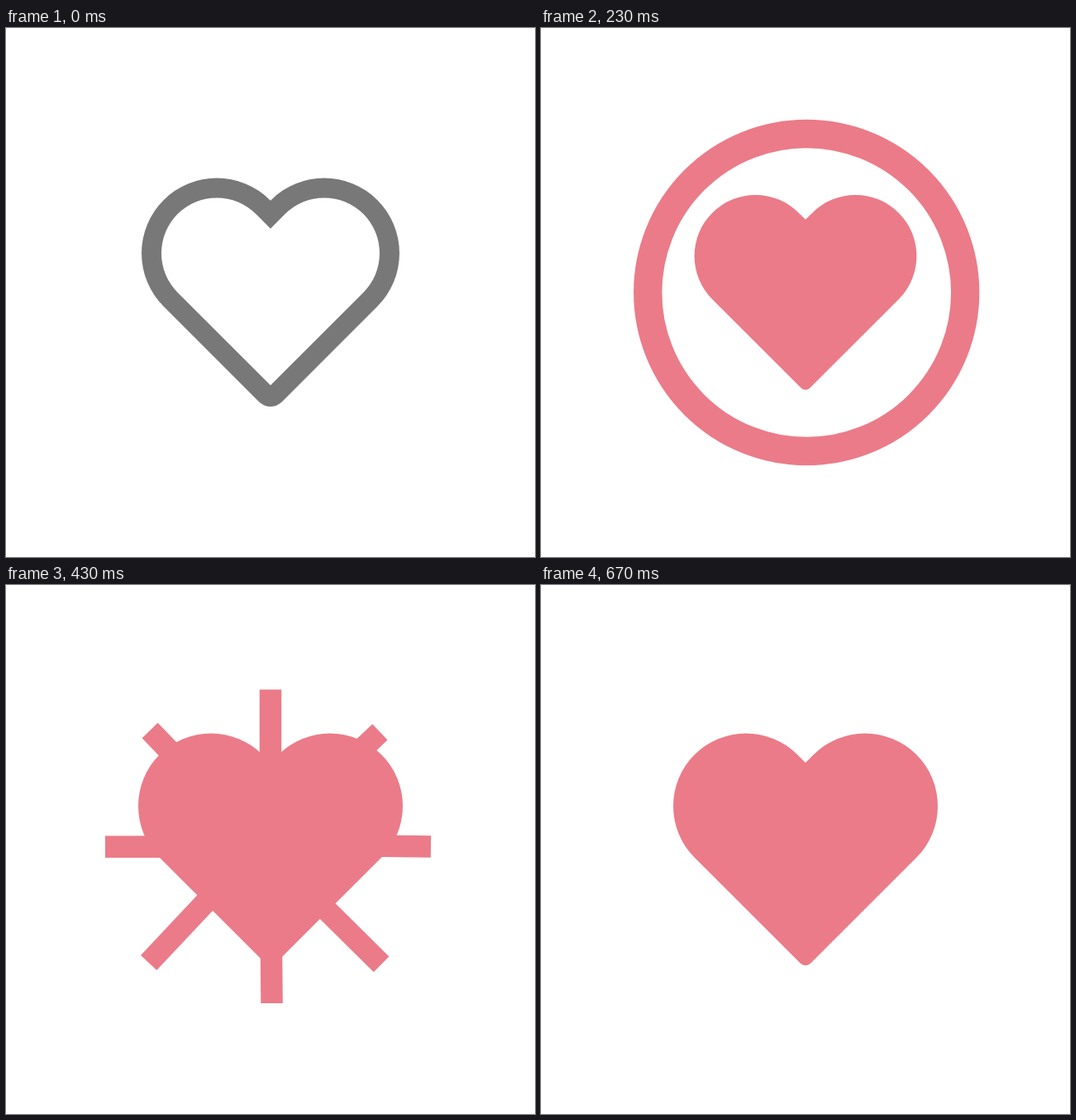
Animation, 640 px wide and 640 px high, one loop 810 ms. Source, as an HTML page with a canvas:

```html
<!DOCTYPE html>
<html lang="en">
<head>
<meta charset="utf-8">
<title>Like button</title>
<style>
html, body { margin: 0; width: 100%; height: 100%; overflow: hidden; background: #fff; }
canvas { display: block; width: 640px; height: 640px; }
</style>
</head>
<body>
<canvas id="stage" width="640" height="640"></canvas>
<script>
const ctx = document.getElementById('stage').getContext('2d');
const PINK = '#eb7b88', GREY = '#787878';
const LOOP = 810, FPS = 30, CENTER = 320;

// Each ray: outer end, inner end, and outward travel over three ticks.
const RAYS = [
  [320, 67.5, 320, 165.5, 59],
  [503.5, 129.5, 436, 193.5, 70.4],
  [579.5, 317.5, 470.5, 316, 65.5],
  [506, 510.3, 437, 442, 73],
  [322.1, 567.5, 321.2, 466, 61.5],
  [124.7, 508, 188.2, 440.5, 70],
  [61, 316.7, 159, 316.7, 59],
  [127.5, 127.5, 189.5, 192, 67.3]
];

// Adds a heart made of two circular lobes and 45 degree sides.
function heart(dx, cy, r, tipRadius) {
  const a = Math.PI / 4, diagonal = r * Math.SQRT2;
  ctx.moveTo(-dx - r * Math.SQRT1_2, cy + r * Math.SQRT1_2);
  ctx.arc(-dx, cy, r, 3 * a, 7 * a);
  ctx.lineTo(0, cy + dx - diagonal);
  ctx.arc(dx, cy, r, 5 * a, 9 * a);
  ctx.arcTo(0, cy + dx + diagonal, -dx, cy + diagonal, tipRadius);
  ctx.closePath();
}

function scaled(scale, color, addPath) {
  if (scale <= 0) return;
  ctx.save();
  ctx.translate(CENTER, CENTER);
  ctx.scale(scale, scale);
  ctx.beginPath();
  addPath();
  ctx.fillStyle = color;
  ctx.fill('evenodd');
  ctx.restore();
}

function outlineHeart() {
  heart(65, -47.5, 91, 20);
  heart(65, -47.5, 67, 0);
}

function ring(radius, width) {
  ctx.beginPath();
  ctx.arc(CENTER + radius * 0.0063, CENTER, radius, 0, Math.PI * 2);
  ctx.lineWidth = width;
  ctx.strokeStyle = PINK;
  ctx.stroke();
}

function rings(tick) {
  if (tick < 5 || tick > 9) return;
  const k = Math.min(tick, 8), growth = (k - 4) / 4;
  ring(256 * growth, growth * (66 - 20.25 * (k - 6)));
  if (k === 8) ring(230.5, 2.2);
}

function rays(tick) {
  if (tick < 10 || tick >= 20) return;
  ctx.fillStyle = PINK;
  for (const [x, y, innerX, innerY, travel] of RAYS) {
    const length = Math.hypot(x - innerX, y - innerY);
    const step = travel / 3;
    const head = step * (Math.min(tick, 17) - 16);
    const tail = tick <= 16
      ? Math.max(-250, -length - 45 * (16 - tick))
      : -length + (length + step) * (tick - 16) / 4;
    ctx.save();
    ctx.translate(x, y);
    ctx.rotate(Math.atan2(y - innerY, x - innerX));
    ctx.fillRect(tail, -13.25, head - tail, 26.5);
    ctx.restore();
  }
}

function draw(now) {
  const tick = Math.floor((now % LOOP) * FPS / 1000 + 0.12);
  ctx.fillStyle = '#fff';
  ctx.fillRect(0, 0, 640, 640);
  scaled(1 - tick / 2, GREY, outlineHeart);
  rings(tick);
  rays(tick);
  const pinkScale = tick < 2 ? 0 : Math.min(1, 0.04 + 0.16 * (tick - 2));
  scaled(pinkScale, PINK, () => heart(72, -52.5, 88, 9));
}

const start = performance.now();
function loop() {
  draw(performance.now() - start);
  requestAnimationFrame(loop);
}
loop();
</script>
</body>
</html>
```
